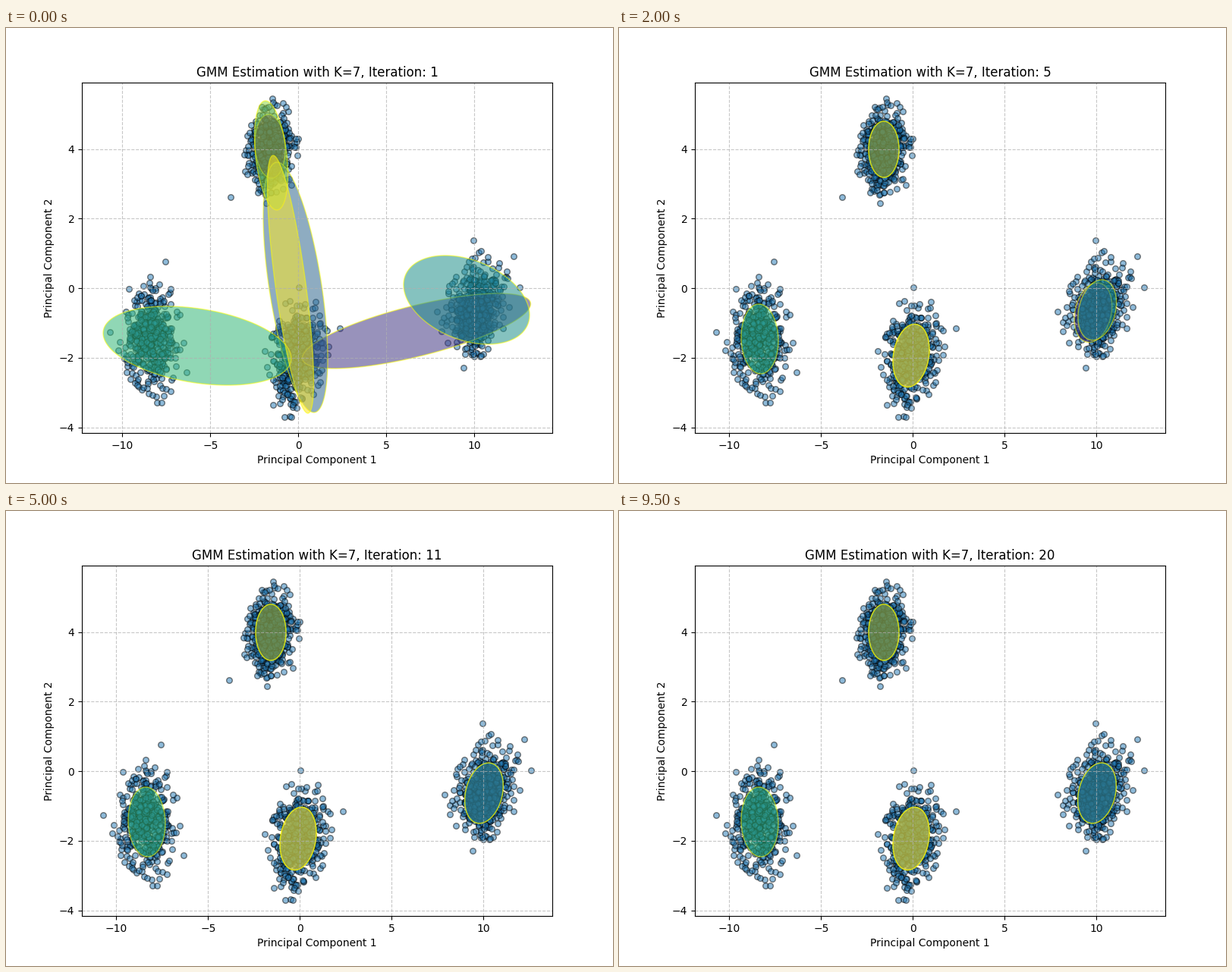
Animation, 800 px wide and 600 px high, one loop 10 s. Source, as a matplotlib script:

```python
import numpy as np
import matplotlib.pyplot as plt
from matplotlib.animation import FuncAnimation
from matplotlib.patches import Polygon

FRAMES, INTERVAL = 20, 500
LEFT, RIGHT, TOP, BOTTOM = 100, 720, 72, 534          # axes box on the stage
WIDE, SETTLED = (-12.30, 14.43), (-11.874, 13.746)    # x limits
YLIM = (-4.161, 5.911)
DECAY = 0.55                                          # error kept per iteration

# Ellipses: centre x, centre y, half width, half height, tilt (stage pixels)
WEST = (185.5, 410, 24.5, 46, 0.05)
NORTH = (349, 160, 20, 37, 0.0)
SOUTH = (385, 432, 24, 41.5, -0.19)
EAST = (630, 372, 25.3, 39.8, -0.24)

# Each component: the cluster it settles on and its initial guess
COMPONENTS = [
    (NORTH, (348, 156, 20, 42, 0.10)),
    (EAST, (541, 399.5, 150.5, 49.5, -0.72)),
    (SOUTH, (381.5, 342, 42.5, 165, 0.57)),
    (EAST, (607, 358.5, 83, 58.5, 0.34)),
    (WEST, (252, 419, 124, 52, 0.32)),
    (NORTH, (349.5, 168, 22, 72, 0.34)),
    (SOUTH, (375, 338, 30.5, 170, 0.75)),
]
FINAL, INITIAL = (np.array(shapes) for shapes in zip(*COMPONENTS))

# The two eastern components start apart and merge
STRAY = np.array([-30.5, 20, -2.8, -3.8, 0.12])
PULL = np.array([0, 1, 0, -0.05, 0, 0, 0])

# Lone points that stand clear of the clouds
LONERS = [(294, 223), (204, 308), (388, 342), (692, 342), (128, 401), (628, 280),
          (683, 301), (352, 93), (378, 513), (444, 396), (234, 454), (578, 374)]


def to_data(px, py, xlim):
    """Stage pixels (y down) to data units."""
    x = np.interp(px, (LEFT, RIGHT), xlim)
    y = np.interp(py, (TOP, BOTTOM), YLIM[::-1])
    return np.column_stack([x, y])


def outline(shape, xlim):
    cx, cy, rx, ry, tilt = shape
    t = np.linspace(0, 2 * np.pi, 121)
    return to_data(cx + rx * np.cos(t), cy + ry * np.sin(t + np.arcsin(tilt)), xlim)


def cloud(rng, shape, count=500, reach=2.8):
    """Gaussian points whose sqrt(2)-sigma contour is the given ellipse."""
    cx, cy, rx, ry, tilt = shape
    u, v = rng.normal(size=(2, count))
    keep = np.hypot(u, v) < reach
    u, v = u[keep] / np.sqrt(2), v[keep] / np.sqrt(2)
    return np.column_stack([cx + rx * u,
                            cy + ry * (tilt * u + np.sqrt(1 - tilt**2) * v)])


def shapes_at(i):
    if i == 0:
        return INITIAL
    return FINAL + np.outer(PULL, STRAY) * DECAY ** (i - 1)


rng = np.random.default_rng(7)
pixels = np.vstack([cloud(rng, s) for s in (WEST, NORTH, SOUTH, EAST)] + [LONERS])
rng.shuffle(pixels)
points = to_data(*pixels.T, SETTLED)

fig, ax = plt.subplots(figsize=(8, 6), dpi=100)
ax.scatter(*points.T, s=30, alpha=0.5, edgecolors="k")
ellipses = [
    ax.add_patch(Polygon([(0, 0)], facecolor=color, edgecolor="yellow", alpha=0.55, lw=1))
    for color in plt.cm.viridis(np.linspace(0, 1, len(COMPONENTS)))
]
ax.set_ylim(YLIM)
ax.set_xlabel("Principal Component 1")
ax.set_ylabel("Principal Component 2")
ax.grid(True, linestyle="--", alpha=0.7)


def update(i):
    xlim = SETTLED if i else WIDE
    for patch, shape in zip(ellipses, shapes_at(i)):
        patch.set_xy(outline(shape, xlim))
    ax.set_xlim(xlim)
    ax.set_title(f"GMM Estimation with K=7, Iteration: {i + 1}")
    return ellipses


anim = FuncAnimation(fig, update, frames=FRAMES, interval=INTERVAL,
                     repeat=True, repeat_delay=0, blit=False)
plt.show()
```
